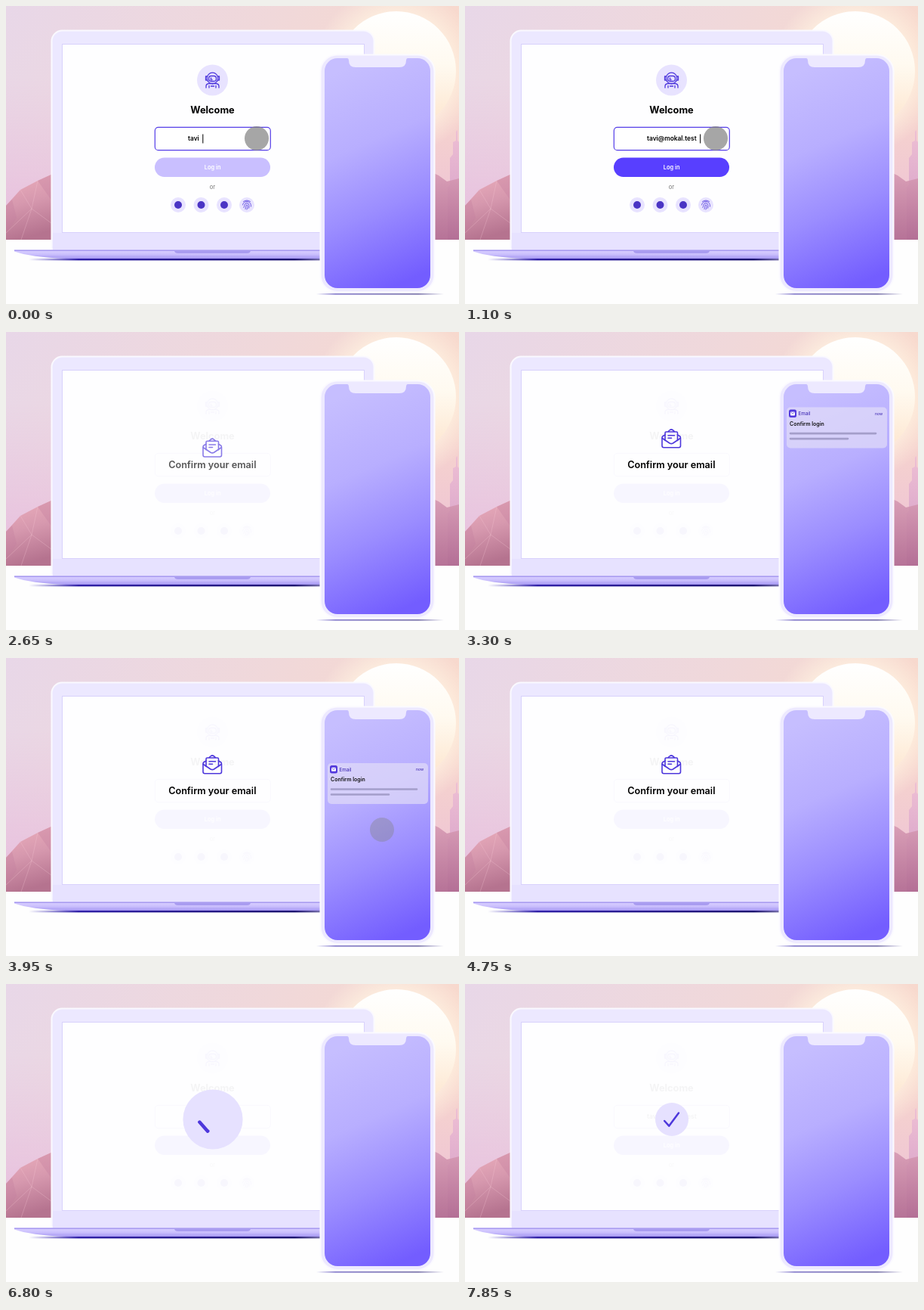
Animation of 600x394 px, one loop 7.9 s. Source, as an HTML page:

```html
<!DOCTYPE html>
<html lang="en">
<head>
<meta charset="utf-8">
<title>Email login</title>
<style>
html, body { margin: 0; width: 100%; height: 100%; overflow: hidden; background: #fff; }
svg { display: block; width: 100vw; height: 100vh; }
text { font-family: Inter, Roboto, sans-serif; font-weight: 600; }
.mid { text-anchor: middle; }
.line { fill: none; stroke: #4d37dc; stroke-linecap: round; stroke-linejoin: round; }
</style>
</head>
<body>
<svg viewBox="0 0 600 394">
  <defs>
    <linearGradient id="sky" x2="1" y2=".3">
      <stop stop-color="#e8d7e8"/><stop offset=".55" stop-color="#f0d8da"/><stop offset="1" stop-color="#f9d9cb"/>
    </linearGradient>
    <linearGradient id="dusk" x2="0" y2="1">
      <stop offset=".3" stop-color="#e6b9dc" stop-opacity="0"/><stop offset="1" stop-color="#e6b0dc" stop-opacity=".7"/>
    </linearGradient>
    <radialGradient id="glow">
      <stop offset=".65" stop-color="#fff3e2" stop-opacity=".8"/><stop offset="1" stop-color="#fff0e0" stop-opacity="0"/>
    </radialGradient>
    <linearGradient id="sun" x2="0" y2="1">
      <stop stop-color="#fff"/><stop offset=".45" stop-color="#fffaf0"/><stop offset="1" stop-color="#fde3cb"/>
    </linearGradient>
    <linearGradient id="rock" x2=".2" y2="1">
      <stop stop-color="#edb0bd"/><stop offset=".5" stop-color="#d698ae"/><stop offset="1" stop-color="#b5738f"/>
    </linearGradient>
    <linearGradient id="hill" x2="0" y2="1">
      <stop stop-color="#d79bb4"/><stop offset="1" stop-color="#b06a90"/>
    </linearGradient>
    <linearGradient id="tower" x2="0" y2="1">
      <stop stop-color="#eebfd4"/><stop offset="1" stop-color="#d09ac6"/>
    </linearGradient>
    <linearGradient id="base" x2="0" y2="1">
      <stop stop-color="#d9d0ff"/><stop offset=".5" stop-color="#cbc0fd"/><stop offset="1" stop-color="#a597f2"/>
    </linearGradient>
    <linearGradient id="shade">
      <stop stop-color="#3524b0" stop-opacity="0"/><stop offset=".15" stop-color="#3020a8"/>
      <stop offset=".8" stop-color="#1c1270"/><stop offset="1" stop-color="#21167a" stop-opacity="0"/>
    </linearGradient>
    <linearGradient id="glass" x1=".42" x2=".62" y2="1">
      <stop stop-color="#c6beff"/><stop offset=".35" stop-color="#b8aeff"/><stop offset=".65" stop-color="#9b8dff"/><stop offset="1" stop-color="#735dff"/>
    </linearGradient>
    <clipPath id="screen"><rect x="422" y="69" width="140" height="304" rx="17"/></clipPath>
  </defs>

  <!-- landscape -->
  <rect width="600" height="310" fill="url(#sky)"/>
  <rect width="600" height="310" fill="url(#dusk)"/>
  <circle cx="517" cy="86" r="112" fill="url(#glow)"/>
  <circle cx="517" cy="86" r="79" fill="url(#sun)"/>
  <path d="M0 264 19 243 42 231 64 221V310H0Z" fill="url(#rock)"/>
  <path d="M0 264 8 256 14 280 0 300ZM42 231 64 262V221Z" fill="#c47f9d" opacity=".35"/>
  <path d="M19 243 34 268 64 290M34 268 0 300M42 231 34 268 20 309" fill="none" stroke="#f3c6d2" stroke-width=".5" opacity=".6"/>
  <path d="M585 310V240L588 236V201L592 196V180L596 178V166L598 164V178L600 180V310Z" fill="url(#tower)"/>
  <path d="M560 218 573 224 584 232 600 228V310H560Z" fill="url(#hill)" opacity=".9"/>
  <rect y="309" width="600" height="85" fill="#fefefe"/>

  <!-- laptop -->
  <rect x="60.5" y="32.5" width="427" height="300" rx="14" fill="#ece8ff" stroke="#faf9ff" stroke-width="2"/>
  <rect x="62" y="300" width="424" height="23" fill="#e7e2ff"/>
  <rect x="74.5" y="50.5" width="400" height="249" fill="#fefeff" stroke="#d8d1fc"/>
  <rect x="30" y="333.8" width="440" height="2.6" fill="url(#shade)"/>
  <path d="M11 322.500H540V334H80Q32 332 11 324.500Z" fill="url(#base)"/>
  <path d="M11 323.200H540" stroke="#a79af0" stroke-width="1.400"/>
  <path d="M223 323H324Q324 327 319 327H228Q223 327 223 323Z" fill="#a99cf0"/>

  <!-- login form -->
  <circle cx="273.5" cy="98" r="20.5" fill="#e8e3ff"/>
  <g class="line" stroke-width="1.3">
    <circle cx="273.5" cy="95.5" r="7.3"/>
    <rect x="268.5" y="92.5" width="10" height="7" rx="3.2"/>
    <path d="M266 93h-1.500v5h1.500M281 93h1.500v5h-1.500M271 95.500h1M271 97.500h2"/>
    <path d="M265 108v-2q0-3 4-3.500h9q4 .5 4 3.500v2M269 108v-2.500M278 108v-2.500M271.500 106h4"/>
  </g>
  <text class="mid" x="273.5" y="142" font-size="12.8" style="font-weight:700">Welcome</text>
  <rect id="field" x="197.3" y="160.3" width="153" height="30.4" rx="4.5" fill="#fff" stroke="#553ee8"/>
  <text id="mail" x="241" y="177.8" font-size="8.4"></text>
  <path id="caret" d="M0 169.500V181.500" stroke="#111" stroke-width="1.1"/>
  <g id="button">
    <rect x="197" y="200.5" width="153" height="25.5" rx="12.75"/>
    <text class="mid" x="273.7" y="216" font-size="7.5" fill="#fff">Log in</text>
  </g>
  <text class="mid" x="273.5" y="241.8" font-size="7.5" fill="#777" style="font-weight:400">or</text>
  <g fill="#e8e3ff">
    <circle cx="228" cy="263" r="10"/><circle cx="258.5" cy="263" r="10"/>
    <circle cx="289" cy="263" r="10"/><circle cx="319" cy="263" r="10"/>
  </g>
  <g fill="#4a34c4">
    <circle cx="228" cy="263" r="5"/><circle cx="258.5" cy="263" r="5"/><circle cx="289" cy="263" r="5"/>
  </g>
  <path class="line" stroke-width=".8" d="M314.500 258.500Q319 255.500 323.500 258.500M313.500 263Q314.500 258.500 319 258.500T324.500 263.500V265M315 266.500Q316 264 316 263 316.500 260.500 319 260.500T322 263.500 321.500 267.500M317 268.500Q318 266 318 263.500 319 262 320 263.500T319 269"/>

  <!-- confirmation layer -->
  <rect id="veil" x="75" y="51" width="399" height="248" fill="#fefeff"/>
  <g id="confirm">
    <g id="envelope" class="line" stroke-width="1.6">
      <path d="M265 136 262.300 137.500Q261 138.300 261 140V150.500Q261 152.700 263.200 152.700H283.300Q285.500 152.700 285.500 150.500V140Q285.500 138.300 284.200 137.500L281.500 136"/>
      <path d="M265 143.500V133.500Q265 132 266.500 132H280Q281.500 132 281.500 133.500V143.500M269 131.500 271.500 129.500Q273.300 128.200 275 129.500L277.500 131.500"/>
      <path d="M261.300 140.500 271 147Q273.300 148.300 275.500 147L285.200 140.500M269 136.800H277.500M269 140.300H273.500"/>
    </g>
    <text class="mid" x="273.3" y="179.9" font-size="12.65">Confirm your email</text>
  </g>
  <path id="spinner" d="M302.500 178A29 29 0 0 1 282.940 205.420" class="line" style="stroke:#573fff" stroke-width="5.4"/>
  <g id="done">
    <circle r="22" fill="#e6e1ff"/>
    <path id="tick" class="line" d="M-9.800 2-3.800 8.700 9-8.500" pathLength="100" stroke-width="2.5"/>
  </g>

  <!-- phone -->
  <rect x="411" y="380.2" width="169" height="1.3" fill="url(#shade)" opacity=".75"/>
  <rect x="416.5" y="64.5" width="151" height="313.5" rx="22" fill="#ede9ff" stroke="#fbfaff" stroke-width="2"/>
  <rect x="422" y="69" width="140" height="304" rx="17" fill="url(#glass)"/>
  <g clip-path="url(#screen)">
    <g id="note">
      <rect x="426" y="139" width="133" height="54" rx="5" fill="#e4e0f8" fill-opacity=".66"/>
      <rect x="429" y="142" width="10" height="10.5" rx="2.5" fill="#5239dc"/>
      <rect x="431" y="144.8" width="6" height="5" rx=".8" fill="#fff"/>
      <path d="M431.300 145.300 434 147.400 436.700 145.300" fill="none" stroke="#5239dc" stroke-width=".7"/>
      <text x="441.5" y="149.5" font-size="6.2" fill="#4935b8" style="font-weight:500">Email</text>
      <text x="543" y="149" font-size="5" fill="#4935b8" style="font-weight:500">now</text>
      <text x="430" y="163.4" font-size="7" fill="#111">Confirm login</text>
      <path d="M431 173.500H544M431 180.500H507" stroke="#a49eca" stroke-width="2.7" stroke-linecap="round"/>
    </g>
  </g>
  <path d="M451 68.500Q454 69 454 72 454 81 463 81H521Q530 81 530 72 530 69 533 68.500Z" fill="#ede9ff"/>

  <circle id="pointer" r="16"/>
</svg>
<script>
const LOOP = 7900, ADDRESS = 'tavi@mokal.test';
const $ = id => document.getElementById(id);
const set = (id, attrs) => { for (const k in attrs) $(id).setAttribute(k, attrs[k]); };

// Progress from a to b, 0 to 1
const ramp = (t, a, b) => Math.min(1, Math.max(0, (t - a) / (b - a)));
const ease = (t, a, b) => { const p = ramp(t, a, b); return p * p * (3 - 2 * p); };
const pulse = (t, a, b, c, d) => ease(t, a, b) - ease(t, c, d);
const scaleAt = (x, y, s) => `translate(${x} ${y}) scale(${s}) translate(${-x} ${-y})`;

function drawForm(t) {
  const count = Math.min(ADDRESS.length, 4 + Math.floor(t / 90));
  const typing = t < 1150;
  $('mail').textContent = ADDRESS.slice(0, count);
  const end = 241 + $('mail').getComputedTextLength();
  set('caret', { transform: `translate(${end + 5} 0)`, opacity: +typing });
  set('field', { 'stroke-width': typing ? 1.2 : .8 });
  set('button', {
    fill: count < ADDRESS.length ? '#c9bfff' : '#583fff',
    transform: scaleAt(273.5, 213.25, 1 - .055 * pulse(t, 1720, 1860, 1950, 2100))
  });
}

function drawLayers(t) {
  set('veil', { opacity: .96 * ease(t, 2250, 2550) });
  set('confirm', { opacity: pulse(t, 2500, 2750, 4850, 5050) });
  set('envelope', { transform: `translate(0 ${12.5 * (1 - ease(t, 2620, 3000))})` });
  set('spinner', {
    opacity: pulse(t, 5000, 5150, 6420, 6540),
    transform: `rotate(${(t - 5600) * .36} 273.5 178)`
  });
  const scale = 1.8 * ease(t, 6500, 6720) - .8 * ease(t, 6830, 7150);
  set('done', { transform: `translate(274 179) scale(${scale})`, opacity: +(t > 6500) });
  const drawn = 100 * ramp(t, 6720, 6990);
  set('tick', { 'stroke-dasharray': `${drawn} 200`, opacity: +(drawn > 0) });
}

function drawNote(t) {
  const slide = -126 * (1 - ease(t, 3050, 3450));
  const press = 1 - .05 * pulse(t, 4240, 4360, 4400, 4520);
  set('note', {
    transform: `translate(0 ${slide}) ` + scaleAt(492, 166, press),
    opacity: 1 - ease(t, 4450, 4650)
  });
}

function drawPointer(t) {
  const move = ease(t, 1200, 1650), onPhone = t > 3000;
  const x = onPhone ? 498 : 332 - 24 * move;
  const y = onPhone ? 227 - 54 * ease(t, 3950, 4220) : 175 + 42.5 * move;
  const press = pulse(t, 1700, 1860, 1950, 2080) + pulse(t, 4220, 4340, 4400, 4500);
  const shown = 1 - ease(t, 2080, 2250) + pulse(t, 3840, 4050, 4480, 4650);
  const grey = 128 - 40 * press;
  set('pointer', {
    cx: x, cy: y, r: 16 - 2.5 * press,
    fill: `rgb(${grey},${grey},${grey})`, opacity: .7 * shown
  });
}

const start = performance.now();
function frame() {
  const t = (performance.now() - start) % LOOP;
  drawForm(t);
  drawLayers(t);
  drawNote(t);
  drawPointer(t);
  requestAnimationFrame(frame);
}
frame();
</script>
</body>
</html>
```
